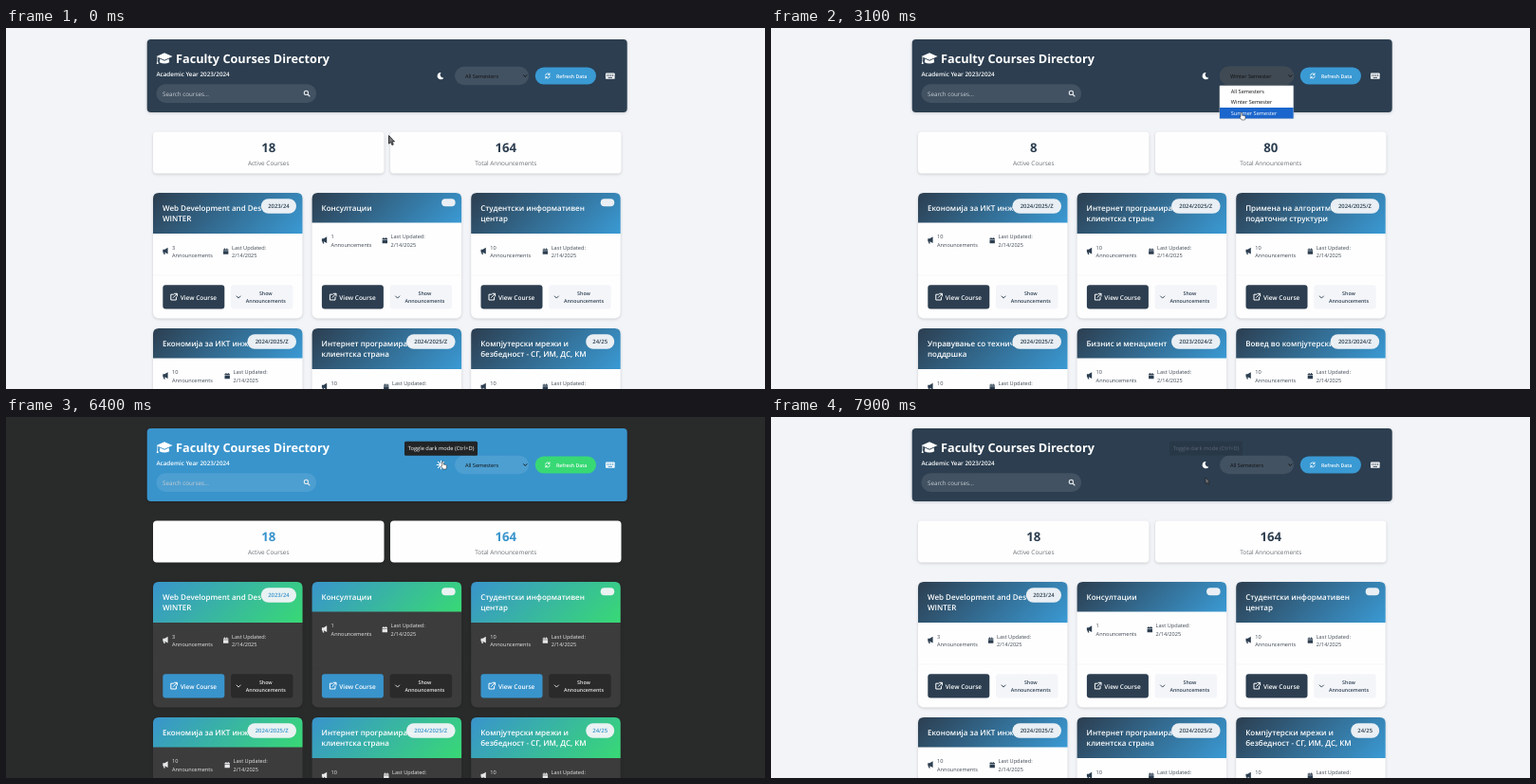
An HTML page that plays this animation: 800x381 px, repeating every 8000 ms.

```html
<!DOCTYPE html>
<html lang="en">
<head>
<meta charset="utf-8">
<title>Faculty Courses Directory</title>
<style>
html, body { margin: 0; width: 100%; height: 100%; overflow: hidden; background: var(--bg); }
svg { display: block; font-family: 'Open Sans', 'Noto Sans', sans-serif; text-rendering: geometricPrecision; }
.shadow { filter: drop-shadow(0 1.3px 1.6px rgba(0, 0, 0, .16)); }
</style>
</head>
<body>
<svg id="stage" width="800" height="381" viewBox="0 0 800 381"></svg>
<script>
const LOOP = 8000, CARD_W = 157.5, CARD_H = 132.5;

// Each colour: light theme, dark theme.
const theme = {
  bg: ['f2f4f8', '1a1a1a'], head: ['2c3e50', '3a9bd6'], accent: ['3a9ad4', '38de6e'],
  card: ['fefefe', '2d2d2d'], text: ['404a55', 'f2f2f2'], strong: ['2c3e50', 'f5f5f5'],
  soft: ['f4f5f9', '1a1a1a'], line: ['eeeff2', '333333']
};

const states = [
  { label: 'All Semesters', courses: 18, total: 164, cards: [
    ['Web Development and Des|WINTER', '2023/24', 3],
    ['Консултации', '', 1],
    ['Студентски информативен|центар', '', 10],
    ['Економија за ИКТ инж', '2024/2025/Z', 10],
    ['Интернет програмирањ|клиентска страна', '2024/2025/Z', 10],
    ['Компјутерски мрежи и|безбедност - СГ, ИМ, ДС, КМ', '24/25', 10]] },
  { label: 'Winter Semester', courses: 8, total: 80, cards: [
    ['Економија за ИКТ инж', '2024/2025/Z', 10],
    ['Интернет програмирањ|клиентска страна', '2024/2025/Z', 10],
    ['Примена на алгоритми|податочни структури', '2024/2025/Z', 10],
    ['Управување со технич|поддршка', '2024/2025/Z', 10],
    ['Бизнис и менаџмент', '2023/2024/Z', 10],
    ['Вовед во компјутерски', '2023/2024/Z', 10]] },
  { label: 'Summer Semester', courses: 4, total: 40, cards: [
    ['Компјутерски архитект', '2023/2024/L', 10],
    ['Математика 2', '2023/2024/L', 10],
    ['Објектно-ориентиран|програмирање', '2023/2024/L', 10],
    ['Основи на сајбер безбе', '2023/2024/L', 10]] }
];

const openTimes = [[1200, 1800], [2700, 3400], [4150, 4800]];

// Pointer: time, x, y
const pointerKeys = [
  [150, 403.5, 113.5], [900, 494, 51], [1350, 494, 51], [1600, 496, 76], [1900, 496, 76],
  [2500, 494, 51], [2750, 494, 51], [3050, 495, 89], [3450, 495, 89], [4000, 512, 52],
  [4300, 512, 54], [4500, 512, 66], [4850, 512, 66], [5200, 459.5, 47], [7600, 459.5, 47], [7880, 458, 64]
];

const text = (s, x, y, size, fill, weight = 400, anchor = 'start') =>
  `<text x="${x}" y="${y}" font-size="${size}" fill="${fill}" font-weight="${weight}" text-anchor="${anchor}">${s}</text>`;
const box = (x, y, w, h, r, fill, extra = '') =>
  `<rect x="${x}" y="${y}" width="${w}" height="${h}" rx="${r}" fill="${fill}" ${extra}/>`;
const path = (d, fill, extra = '') => `<path d="${d}" fill="${fill}" ${extra}/>`;
const stroke = (d, color, width) =>
  path(d, 'none', `stroke="${color}" stroke-width="${width}" stroke-linecap="round" stroke-linejoin="round"`);

const gradient = (id, h) => {
  const w = CARD_W;
  return `<linearGradient id="${id}" gradientUnits="userSpaceOnUse" x1="${(w - h) / 4}" y1="${(h - w) / 4}"
    x2="${(3 * w + h) / 4}" y2="${(w + 3 * h) / 4}"><stop style="stop-color:var(--head)"/>
    <stop offset="1" style="stop-color:var(--accent)"/></linearGradient>`;
};

function card([title, badge, count], i) {
  const x = 155 + i % 3 * 167.6, y = 174 + Math.floor(i / 3) * 143;
  const lines = title.split('|'), h = lines.length > 1 ? 43 : 31.5;
  const ink = 'var(--text)', strong = 'var(--strong)';
  const badgeW = badge ? 12 + 3.6 * badge.length : 14.5, badgeX = 151 - badgeW;
  const dateX = count === 10 ? 84.5 : 83;
  return `<g transform="translate(${x} ${y})">` +
    box(0, 0, CARD_W, CARD_H, 6, 'var(--card)', 'class="shadow"') +
    path(`M0 ${h}V6Q0 0 6 0H151.5Q157.5 0 157.5 6V${h}z`, `url(#grad${lines.length})`) +
    lines.map((s, k) => text(s, 10, 18.8 + k * 11.5, 8, '#fff', 600)).join('') +
    box(badgeX, 6.3, badgeW, badge ? 15.5 : 8, badge ? 7.75 : 4, '#f1f4f7', 'fill-opacity=".96"') +
    text(badge, badgeX + badgeW / 2, 16.2, 5.9, 'var(--badge)', 600, 'middle') +
    `<g transform="translate(0 ${h})">` +
    path('M10.3 16.8H12.2L15.6 14.8V21.6L12.2 19.8L12.8 22H11.4L10.8 19.8H10.3z', strong) +
    text(count, 20, 16.6, 5.6, ink) + text('Announcements', 20, 25, 5.6, ink) +
    path(`M${dateX - 9} 16.6h1v-1h.9v1h1.4v-1h.9v1h1.2v1.1h-5.4zm0 1.6h5.4v3.6h-5.4z`, strong) +
    text('Last Updated:', dateX, 16.6, 5.6, ink) + text('2/14/2025', dateX, 25, 5.6, ink) + '</g>' +
    box(0, 86.6, CARD_W, .6, 0, 'var(--line)') +
    box(10.3, 97.2, 65, 25.2, 3, 'var(--head)') +
    stroke('M21.5 107.2H18.8V113H24.4V110.2M21.4 110.4L25.2 106.5M22.6 106.3H25.4V109', '#fff', 1) +
    text('View Course', 28.7, 112.5, 6.5, '#fff', 600) +
    box(82, 97.2, 65.5, 25.2, 3, 'var(--soft)') +
    stroke('M88 109l2.1 2.1 2.1-2.1', strong, .9) +
    text('Show', 118.8, 108.3, 5.3, strong, 600, 'middle') +
    text('Announcements', 118.8, 115.6, 5.3, strong, 600, 'middle') + '</g>';
}

const stat = (x, value, label) => box(x, 109.6, 243.5, 43.8, 4, '#fefefe', 'class="shadow"') +
  text(value, x + 121.7, 131, 13.2, 'var(--badge)', 700, 'middle') +
  text(label, x + 121.7, 145, 6.4, '#6a6f75', 400, 'middle');

const view = s => '<g class="view">' + stat(155, s.courses, 'Active Courses') +
  stat(405, s.total, 'Total Announcements') + s.cards.map(card).join('') +
  text(s.label, 484, 52.8, 5.6, '#111') + '</g>';

const sunRays = Array.from({ length: 8 }, (_, i) => {
  const a = i * Math.PI / 4, c = Math.cos(a), s = Math.sin(a);
  return `M${458.5 + 3 * c} ${50.5 + 3 * s}L${458.5 + 4.3 * c} ${50.5 + 4.3 * s}`;
}).join('');

const keyboard = box(632, 47.4, 9.6, 6.4, .9, '#fff') + [0, 1, 2, 3].map(i =>
  box(633.1 + i * 2, 48.7, 1.1, .9, 0, 'var(--head)') + box(633.1 + i * 2, 50.2, 1.1, .9, 0, 'var(--head)')).join('') +
  box(634.6, 51.9, 4.4, .9, 0, 'var(--head)');

const stage = document.getElementById('stage');
stage.innerHTML = `<defs>${gradient('grad1', 31.5)}${gradient('grad2', 43)}</defs>` +
  box(0, 0, 800, 381, 0, 'var(--bg)') +
  box(148.7, 12, 506, 77, 4, 'var(--head)', 'class="shadow"') +
  path('M158.5 30L167 26.3L175.6 30L167 33.7z', '#fff') +
  path('M162.3 32.6L167 34.7L171.7 32.6L172.2 36.2Q167 39 161.8 36.2z', '#fff') +
  stroke('M159.8 30.8V34', '#fff', .8) + path('M159.7 33.4l1 4.6h-2z', '#fff') +
  text('Faculty Courses Directory', 179, 36.8, 12.7, '#fff', 700) +
  text('Academic Year 2023/2024', 158.4, 50.8, 6.3, '#fff', 600) +
  box(158.4, 59.3, 168.8, 19.6, 9.8, '#fff', 'fill-opacity=".1"') +
  text('Search courses...', 165, 71.6, 6.25, '#c6ccd2') +
  stroke('M318.5 68.4a2.1 2.1 0 1 1-4.2 0a2.1 2.1 0 1 1 4.2 0M318 70L320 72', '#e6e9ec', 1.1) +
  `<g id="moon">${path('M458.6 47.1A3.6 3.6 0 1 0 461.4 52.4A3.1 3.1 0 0 1 458.6 47.1z', '#fff')}</g>` +
  `<g id="sun"><circle cx="458.5" cy="50.5" r="2.3" fill="#fff"/>${stroke(sunRays, '#fff', 1.1)}</g>` +
  box(473, 40.8, 78, 19.4, 9.7, '#fff', 'fill-opacity=".1"') +
  box(472.7, 40.5, 78.6, 20, 10, '#404a54', 'id="focus" stroke="#f4f4f4" stroke-width="1"') +
  stroke('M545.6 49.7l1.7 1.8 1.7-1.8', '#111', .9) +
  box(557.8, 41.4, 64.2, 18.2, 9.1, 'var(--accent)') +
  stroke('M568.6 50A2.3 2.3 0 0 1 572.8 49M573 47.8V49.4H571.4M573.2 51A2.3 2.3 0 0 1 569 52M568.8 53.2V51.6H570.4', '#fff', .8) +
  text('Refresh Data', 580, 52.6, 5.2, '#fff', 600) + keyboard +
  states.map(view).join('') +
  '<g id="menu">' + box(472.8, 60.8, 78, 34.8, .6, '#fff', 'stroke="#8b8f94" stroke-width=".4"') +
  box(473, 61, 77.6, 11.5, 0, '#1b66cc', 'id="mark"') +
  states.map((s, i) => text(s.label, 484.8, 69 + i * 11.4, 5.6, '#111')).join('') + '</g>' +
  '<g id="tip">' + box(420, 25.8, 77, 15, 1.5, '#fff') +
  text('Toggle dark mode (Ctrl+D)', 458.5, 35.4, 5.75, '#444', 400, 'middle') + '</g>' +
  '<g id="arrow">' + path('M0 0V8.6L2 6.9L3.4 10L4.8 9.4L3.4 6.4H6z', '#777', 'stroke="#15181c" stroke-width=".8"') + '</g>' +
  '<g id="hand">' + path('M.8 0Q1.6 0 1.6 1V3.2L4.5 3.8Q5.3 4 5.1 5L4.5 8H1L-1 5Q-.9 4.2 0 4.8V1Q0 0 .8 0z',
    '#fff', 'stroke="#222" stroke-width=".5"') + '</g>';

const el = Object.fromEntries(['moon', 'sun', 'focus', 'menu', 'mark', 'tip', 'arrow', 'hand']
  .map(id => [id, document.getElementById(id)]));
const views = [...document.querySelectorAll('.view')];
const options = [...el.menu.querySelectorAll('text')];
const [tipBox, tipText] = el.tip.children;

const clamp = v => Math.max(0, Math.min(1, v));
const ease = v => v * v * (3 - 2 * v);
const ramp = (t, from, to) => ease(clamp((t - from) / (to - from)));
const show = (node, on) => node.style.display = on ? '' : 'none';
const mix = ([a, b], k) => 'rgb(' + [0, 2, 4].map(i => {
  const p = parseInt(a.substr(i, 2), 16), q = parseInt(b.substr(i, 2), 16);
  return Math.round(p + (q - p) * k);
}) + ')';

function pointerAt(t) {
  let [, x, y] = pointerKeys[0];
  for (let i = 1; i < pointerKeys.length; i++) {
    const [t0, x0, y0] = pointerKeys[i - 1], [t1, x1, y1] = pointerKeys[i];
    if (t < t0) break;
    const k = ramp(t, t0, t1);
    x = x0 + (x1 - x0) * k;
    y = y0 + (y1 - y0) * k;
  }
  return [x, y];
}

function draw(t) {
  const dark = ramp(t, 6150, 6450) - ramp(t, 7450, 7750);
  const root = document.documentElement.style;
  for (const name in theme) root.setProperty('--' + name, mix(theme[name], dark));
  root.setProperty('--badge', mix(theme.head, dark));
  show(el.moon, dark < .5);
  show(el.sun, dark >= .5);

  const selected = t < 1800 ? 0 : t < 3400 ? 1 : t < 4800 ? 2 : 0;
  views.forEach((v, i) => show(v, i === selected));

  const [x, y] = pointerAt(t);
  const open = openTimes.some(([a, b]) => t >= a && t < b);
  const row = y > 61 ? Math.min(2, Math.floor((y - 61) / 11.5)) : selected;
  show(el.menu, open);
  el.mark.setAttribute('y', 61 + row * 11.5);
  options.forEach((o, i) => o.setAttribute('fill', i === row ? '#fff' : '#111'));
  show(el.focus, t >= 1200 && t < 6150);
  el.focus.setAttribute('stroke-opacity', open ? 0 : 1);

  const darkTip = t > 6300;
  tipBox.setAttribute('fill', darkTip ? '#222426' : '#fff');
  tipText.setAttribute('fill', darkTip ? '#fff' : '#444');
  el.tip.setAttribute('opacity', ramp(t, 5500, 5650) * (1 - .8 * ramp(t, 7720, 7900)));

  const overSelect = x > 473 && x < 551 && y > 41 && y < (open ? 96 : 60);
  const overMoon = Math.hypot(x - 459, y - 49) < 8;
  const hand = overSelect || overMoon;
  show(el.hand, hand);
  show(el.arrow, !hand);
  el.hand.setAttribute('transform', `translate(${x} ${y})`);
  el.arrow.setAttribute('transform', `translate(${x} ${y}) scale(${t < 7000 ? 1 : .75})`);
}

function tick() {
  draw(performance.now() % LOOP);
  requestAnimationFrame(tick);
}
tick();
</script>
</body>
</html>
```
